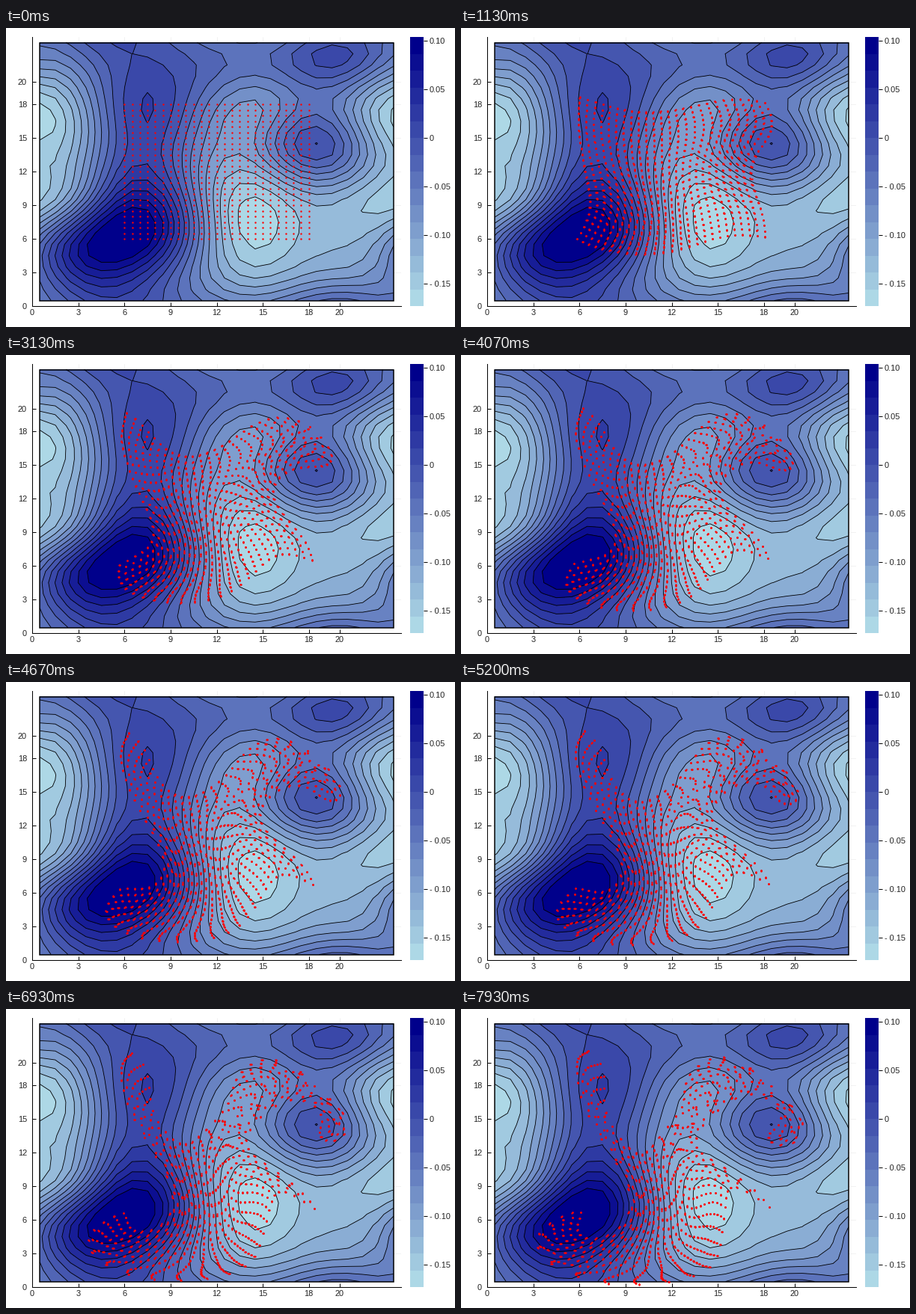
A matplotlib script that plays this animation: 600x400 px, repeating every 8 s.

```python
import numpy as np
import matplotlib.pyplot as plt
from matplotlib.animation import FuncAnimation
from matplotlib.colors import ListedColormap

plt.rcParams["font.family"] = "Liberation Sans"
plt.rcParams["font.size"] = 7.9

SIZE = 24            # side of the periodic box
FRAMES = 120
LOOP_MS = 8000
RATE = 0.47          # box units per second for one contour level per unit
TRAIL = 3
PX = 0.72            # one pixel in points
LOW, STEP = -0.173, 0.277 / 16
WAVE = 2 * np.pi / SIZE
WIDTH = 0.9          # kernel width, in radians of the box
MEAN = 6.5

# Key points of the stream function: x, y, contour level.
peaks = [(4.6, 4.8, 16), (7.2, 8.2, 15.7), (7.5, 17.3, 11.2),
         (18.2, 14.4, 10.1), (20.9, 22.5, 10.1)]
troughs = [(14.4, 7, 0.3), (0.2, 16.2, 0.4), (23, 9.5, 1.5)]
saddles = [(19.2, 7.3, 2.5), (7.5, 13.5, 10.7), (15, 17.2, 4.9),
           (20, 18.7, 6.7), (0.5, 3, 8.3), (7, 22.9, 9.95)]
slopes = [(4.6, 1, 11.2), (1.8, 4.8, 11.8), (4.4, 7, 15), (9.5, 6, 11),
          (10.75, 8.5, 7), (16, 7.3, 1), (14.5, 3.5, 2), (14.8, 1, 5),
          (10, 2, 7.3), (20, 1.5, 6.5), (22.5, 4.5, 4.8), (0.5, 7.9, 4),
          (3, 9, 7), (1, 11.5, 1.8), (3, 14, 3.8), (5, 12, 9.1),
          (5, 18, 8.5), (1, 22.5, 6.5), (10, 18, 9), (11.5, 13, 5),
          (12.5, 22, 8.1), (15.5, 23.5, 7.3), (15.5, 11.5, 3.6),
          (18.3, 10.7, 5), (21.8, 15, 4.5), (22.6, 19, 3.2)]
KEYS = np.array(peaks + troughs + saddles + slopes)


def kernel(p):
    """Periodic bumps around the key points, and the angles to them."""
    ang = WAVE * (p[:, None, :] - KEYS[None, :, :2])
    return np.exp((np.cos(ang).sum(2) - 2) / WIDTH ** 2), ang


gram = kernel(KEYS[:, :2])[0] + 0.005 * np.eye(len(KEYS))
WEIGHTS = np.linalg.solve(gram, KEYS[:, 2] - MEAN)


def stream(p):
    return MEAN + kernel(p)[0] @ WEIGHTS


def velocity(p):
    k, ang = kernel(p)
    slope = -WAVE / WIDTH ** 2 * np.einsum("ij,j,ijk->ik",
                                           k, WEIGHTS, np.sin(ang))
    return RATE * np.column_stack([-slope[:, 1], slope[:, 0]])


def advance(p, dt):
    a = velocity(p)
    b = velocity(p + a * dt / 2)
    return p + b * dt


def paths():
    side = np.linspace(6, 18, 25)
    p = np.array([(x, y) for x in side for y in side])
    out = [p]
    for _ in range(FRAMES - 1):
        p = advance(p, LOOP_MS / FRAMES / 1000)
        out.append(p)
    return np.array(out) % SIZE


def box(x0, y0, x1, y1):
    """Axes rectangle from pixel corners, y measured downwards."""
    return [x0 / 600, 1 - y1 / 400, (x1 - x0) / 600, (y1 - y0) / 400]


light = np.array([173, 216, 230]) / 255
dark = np.array([0, 0, 139]) / 255
mix = np.linspace(0, 1, 16)[:, None]
cmap = ListedColormap(light + (dark - light) * mix)

fig = plt.figure(figsize=(6, 4), dpi=100, facecolor="white")

# Contour plot
ax = fig.add_axes(box(35, 12, 528, 372))
mid = np.arange(SIZE) + 0.5
gx, gy = np.meshgrid(mid, mid)
psi = stream(np.column_stack([gx.ravel(), gy.ravel()])).reshape(gx.shape)
psi = np.clip(psi, 0.01, 15.99)
ax.contourf(mid, mid, psi, levels=np.arange(17), cmap=cmap, vmin=0, vmax=16,
            antialiased=False)
ax.contour(mid, mid, psi, levels=np.arange(1, 16), colors="black",
           linewidths=0.85 * PX)
ax.add_patch(plt.Rectangle((0.5, 0.5), SIZE - 1, SIZE - 1, fill=False,
                           ec="black", lw=1.5 * PX, zorder=3))

ticks = [0, 3, 6, 9, 12, 15, 18, 20]
ax.set(xlim=(0, SIZE), ylim=(0, SIZE), xticks=ticks, yticks=ticks)
ax.set_axisbelow(True)
ax.grid(color="black", alpha=0.1, lw=0.5 * PX)
ax.spines[["top", "right"]].set_visible(False)
ax.spines[["left", "bottom"]].set_linewidth(PX)
ax.tick_params(direction="in", length=5 * PX, width=PX, labelcolor="#222222")
ax.tick_params(axis="x", pad=3.2)
ax.tick_params(axis="y", pad=5)

# Colour bar
bar = fig.add_axes(box(540, 12, 558, 372))
bar.imshow(np.arange(16)[:, None], cmap=cmap, origin="lower", aspect="auto",
           extent=(0, 1, 0, 16), interpolation="nearest")
marks = np.array([0.10, 0.05, 0, -0.05, -0.10, -0.15])
names = ["0.10", "0.05", "0", "- 0.05", "- 0.10", "- 0.15"]
bar.set_xticks([])
bar.set_yticks((marks - LOW) / STEP, names)
bar.set_ylim(0, 16)
bar.yaxis.tick_right()
bar.tick_params(axis="y", length=5 * PX, width=PX, pad=2.2,
                labelcolor="#222222")
bar.spines[:].set_visible(False)

# Tracers
track = paths()
dots, = ax.plot([], [], "o", color="red", mew=0, ms=1.75, zorder=5)


def draw(k):
    pts = track[max(0, k - TRAIL + 1):k + 1].reshape(-1, 2)
    dots.set_data(pts[:, 0], pts[:, 1])
    return dots,


anim = FuncAnimation(fig, draw, frames=FRAMES, interval=LOOP_MS / FRAMES,
                     init_func=lambda: draw(0), repeat=True, repeat_delay=0)
plt.show()
```
